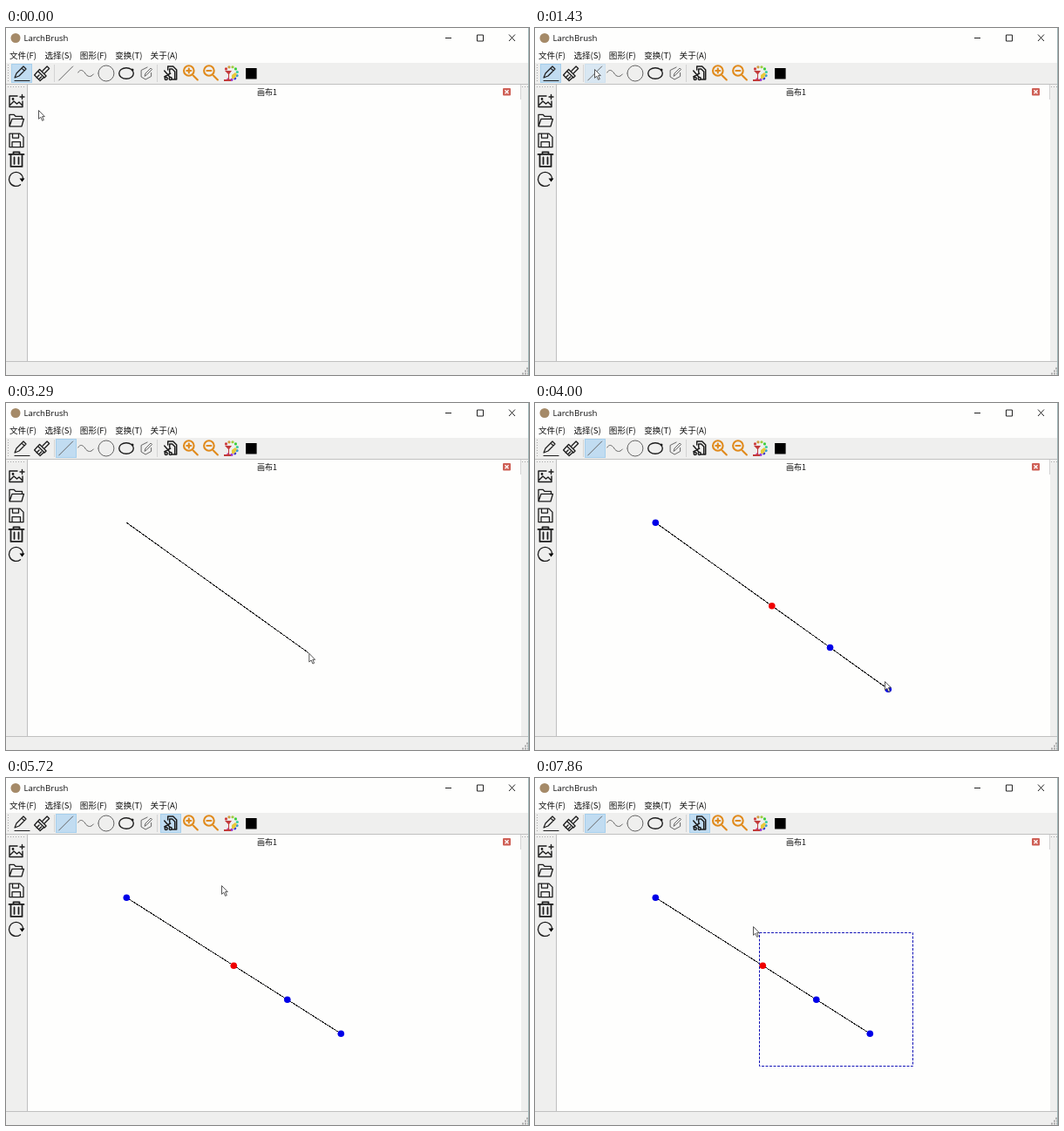
An HTML page for the animation above (8000 ms loop, 600 by 398 pixels).

```html
<!DOCTYPE html>
<html lang="zh">
<head>
<meta charset="utf-8">
<title>LarchBrush</title>
<style>
html, body { margin: 0; width: 100%; height: 100%; overflow: hidden; background: #fefefd; }
svg { display: block; width: 100vw; height: 100vh; }
text { font-family: "Noto Sans CJK SC", "Noto Sans CJK", "Noto Sans CJK JP", sans-serif; fill: #111; }
.title { font: 9.6px "Open Sans", sans-serif; }
.menu { font-size: 9.6px; }
.tab { font-size: 9px; }
.icon { fill: none; stroke-linejoin: round; stroke-linecap: round; }
.on { fill: #c1dcf1; stroke: #a6cfec; }
.hover { fill: #d9e7f2; stroke: #cfe1ee; }
</style>
</head>
<body>
<svg viewBox="0 0 600 398">
  <rect width="600" height="398" fill="#fefefd"/>
  <circle cx="11" cy="11.5" r="5.5" fill="#a58a68"/>
  <text class="title" x="20.5" y="15">LarchBrush</text>
  <path d="M504 11.5h7M540.500 8h7v7h-7zM577 7.500l7 7.500M584 7.500l-7 7.500" fill="none" stroke="#222"/>
  <g id="menu" class="menu"></g>

  <path d="M0 40H600V65H25V383H591V65H600V398H0z" fill="#efefee"/>
  <path d="M0 64.500H600M24.500 65V383M0 382.500H600" fill="none" stroke="#c0c0c0"/>
  <path d="M55.500 42V62M173.500 42V62M590.500 65V82" stroke="#d4d4d4"/>
  <path d="M2.500 42V62M2 67.500H23M592 67.500H599" stroke="#aaa" stroke-dasharray="1 2"/>
  <path d="M592 396.500H599M595 393.500H599M597 390.500H599" stroke="#aaa" stroke-width="2" stroke-dasharray="2 1"/>
  <path d="M599.500 0V398" stroke="#9fb4b6"/>

  <g id="marks"></g>
  <g id="icons"></g>

  <text class="tab" x="288" y="77">画布1</text>
  <rect x="570" y="69" width="9" height="8.500" rx="1" fill="#ce5f55"/>
  <path d="M572.500 71.200l4 4m0-4l-4 4" stroke="#fff" stroke-width="1.400"/>

  <g id="shape">
    <line id="line" stroke="#222" shape-rendering="crispEdges"/>
    <g id="dots"></g>
  </g>
  <rect id="band" fill="none" stroke="#1414b8" stroke-dasharray="3 1.500"/>
  <path id="cursor" d="M.5 .5V10.300L2.800 8.200 4.600 12.300 6.300 11.500 4.500 7.600H7.300z" fill="#fff" stroke="#444" stroke-width=".9"/>
</svg>
<script>
const NS = 'http://www.w3.org/2000/svg';
const $ = id => document.getElementById(id);
const set = (el, attrs) => { for (const k in attrs) el.setAttribute(k, attrs[k]); return el; };
const add = (parent, tag, attrs) => set(parent.appendChild(document.createElementNS(NS, tag)), attrs);
const show = (el, on) => el.style.display = on ? '' : 'none';
const clamp = (v, lo, hi) => Math.min(hi, Math.max(lo, v));
const ring = (x, y, rx, ry = rx) => `M${x - rx} ${y}a${rx} ${ry} 0 1 0 ${2 * rx} 0a${rx} ${ry} 0 1 0 ${-2 * rx} 0`;

['文件(F)', '选择(S)', '图形(F)', '变换(T)', '关于(A)'].forEach((label, i) =>
  add($('menu'), 'text', { x: 4 + 40.4 * i, y: 35 }).textContent = label);

// Icons are drawn around their own centre.
const toolX = i => 18 + 23.1 * i + (i > 1 ? 4.5 : 0) + (i > 6 ? 4.5 : 0);
const sideY = i => 84 + 22.3 * i;
const black = '#1c1c1c', grey = '#666', orange = '#e08a1c';
const lens = ring(-2, -3, 5.8) + 'M3 2.5l5 5';

const tools = [
  ['M-8 5l2-5 8-8 3 3-8 8zM0-6l3 3M-8 8.500H9', black, 1.2],
  ['M1-3l5-5 2.500 2.500-5 5M-2.500-4.500l7.500 7.500-2 2-7.500-7.500zM-5-2l-3.500 4 6.500 6.500 4.500-4M-6 5l3-3M-3.500 7l3-3', black, 1.3],
  ['M-8 8L8-8', grey, 1],
  ['M-9-1c2-4 5.500-3 8 1s6.500 5 9.500 1', grey, 1],
  [ring(0, 0, 9), grey, 1],
  [ring(0, 0, 8.3, 6.3) + ring(7, -4, .8), black, 1.4],
  ['M1-7l-7 3.500v7.500l5 3 6.500-3.500v-4M-2 3l1-3 6-6 1.500 1.500-6 6z', grey, 1],
  ['M-3-4v-4h6l4 4v11h-3M-1-1v-4h3l3 3v9h-4M-7-3l6 7M-7 4l7-4' + ring(-5, 6, 1.5) + ring(0, 6, 1.5), black, 1.5],
  [lens + 'M-4.500-3h5M-2-5.500v5', orange, 2.1],
  [lens + 'M-4.500-3h5', orange, 2.1]
];
const sides = [
  ['M1-6H-8V6.500H7V0M4-5h5M6.500-7.500v5M-7 4l4-4 3.500 3 2.500-2 3.500 3.500' + ring(-4, -2.5, .7), black, 1.4],
  ['M-8 6.500V-7h5l2 2h7.500v3M-8 6.500l3-8.500h13.500l-2.500 8.500z', black, 1.3],
  ['M-8-7.500h12l4 4V8H-8zM-4.500-7v4.500h7V-7M-5 7.500v-5.500h9.500v5.500', black, 1.3],
  ['M-8.500-6h17M-3.500-6v-2.500h7V-6M-6.500-6v14h13v-14M-2.500-2.500v7.500M2.500-2.500v7.500', black, 1.8],
  ['M4.500 6.500A8 8 0 1 1 7.500-.5', black, 1.3]
];
const icon = (x, y, [d, stroke, w]) =>
  add($('icons'), 'path', { class: 'icon', d, stroke, 'stroke-width': w, transform: `translate(${x} ${y})` });
tools.forEach((t, i) => icon(toolX(i), 52, t));
sides.forEach((s, i) => icon(12, sideY(i), s));
add($('icons'), 'path', { d: 'M15.500 172.500h6l-3 4z' });

const wheel = add($('icons'), 'g', { transform: `translate(${toolX(10)} 52)` });
for (let i = 0; i < 9; i++) {
  const a = i * .55 - 2.4;
  add(wheel, 'circle', { cx: 7.5 * Math.cos(a), cy: 7.5 * Math.sin(a), r: 1.6, fill: `hsl(${i * 40} 60% 52%)` });
}
add(wheel, 'path', { d: 'M-7-3h8l-3 4v7h-1v-7zM-8 7h8v2h-8z', fill: '#c23a3a' });
add(wheel, 'path', { d: 'M1 2l4-3 2 2-3 5h-3z', fill: '#e7c93a' });
add($('icons'), 'rect', { x: toolX(11) - 6, y: 46, width: 12.5, height: 12.5 });

const marks = Array.from({ length: 12 }, (_, i) =>
  add($('marks'), 'rect', { x: Math.round(toolX(i)) - 11.5, y: 41.5, width: 23, height: 21 }));
const handles = [[0, '#0000e8'], [.5, '#f00000'], [.75, '#0000e8'], [1, '#0000e8']]
  .map(([at, fill]) => ({ at, el: add($('dots'), 'circle', { r: 3.8, fill }) }));

// Times are in ticks, seven per second.
const LOOP = 8000, RATE = 7;
const CLICK_LINE = 12, PRESS = 20, RELEASE = 26, GRAB = 28, DROP = 31, CLICK_SELECT = 37, BAND = 43, BAND_END = 50;
const home = [37, 94], start = [138, 137], end = [405, 328], grip = [401, 319], corner = [257, 177];
const moves = [
  [2, 8, [68, 47]],
  [CLICK_LINE, 15, [152, 208]],
  [15, 17, [160, 146]],
  [17, PRESS, start],
  [PRESS + 1, RELEASE, end],
  [RELEASE, GRAB, grip],
  [GRAB, DROP, [380, 284]],
  [DROP, 34, [190, 51]],
  [CLICK_SELECT, 40, [247, 123]],
  [40, 42, corner],
  [BAND, BAND_END, [433, 330]],
  [52, 55, [250, 170]]
];

const easeOut = p => 1 - (1 - p) ** 3;
const pointer = k => moves.reduce((from, [t0, t1, to]) => {
  const p = easeOut(clamp((k - t0) / (t1 - t0), 0, 1));
  return from.map((v, i) => v + (to[i] - v) * p);
}, home);

// The line follows the drag, then the handle keeps its distance from the pointer.
const lineEnd = k => k < GRAB
  ? pointer(Math.min(k, RELEASE))
  : pointer(Math.min(k, DROP)).map((v, i) => v + end[i] - grip[i]);

function draw(ms) {
  const k = Math.floor(Math.floor(ms / 10) * RATE / 100);
  const [x, y] = pointer(k);
  set($('cursor'), { transform: `translate(${x} ${y})` });

  marks.forEach((el, i) => {
    const on = i === (k < CLICK_LINE ? 0 : 2) || (i === 7 && k >= CLICK_SELECT);
    const over = y > 41 && y < 63 && Math.abs(x - toolX(i)) < 11.5;
    show(el, on || over);
    set(el, { class: on ? 'on' : 'hover' });
  });

  const [ex, ey] = lineEnd(k);
  show($('shape'), k > PRESS);
  show($('dots'), k >= RELEASE);
  set($('line'), { x1: start[0], y1: start[1], x2: ex, y2: ey });
  handles.forEach(({ at, el }) => set(el, {
    cx: start[0] + (ex - start[0]) * at + .3,
    cy: start[1] + (ey - start[1]) * at + .3
  }));

  const [bx, by] = pointer(Math.min(k - .3, BAND_END));
  show($('band'), k > BAND);
  set($('band'), {
    x: corner[0] + .5, y: corner[1] + .5,
    width: Math.max(0, Math.round(bx) - corner[0]),
    height: Math.max(0, Math.round(by) - corner[1])
  });
}

const t0 = performance.now();
function tick() {
  draw((performance.now() - t0) % LOOP);
  requestAnimationFrame(tick);
}
tick();
</script>
</body>
</html>
```
